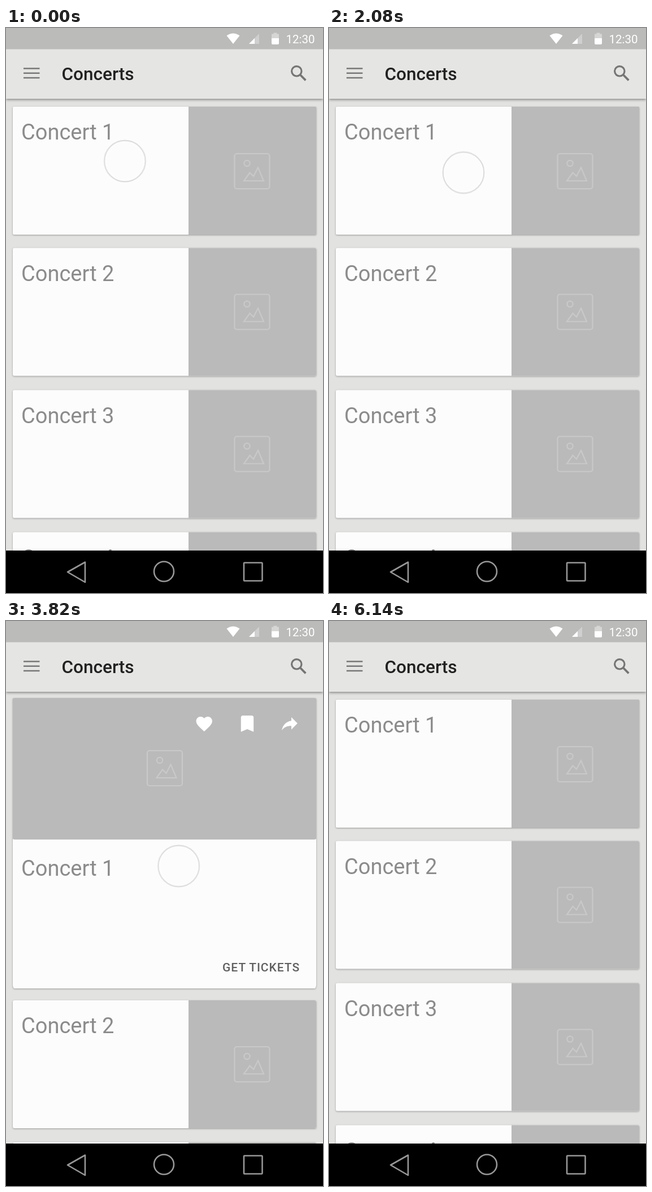
An HTML page for the animation above (6.94 s loop, 561x998 px).

```html
<!DOCTYPE html>
<html lang="en">
<head>
<meta charset="utf-8">
<title>Concerts</title>
<style>
  :root {
    --standard: cubic-bezier(.4, 0, .2, 1);
    --sine: cubic-bezier(.37, 0, .63, 1);
    --out: cubic-bezier(.2, .5, .5, 1);
  }
  html, body { margin: 0; width: 100%; height: 100%; overflow: hidden; background: #e2e2e1; }
  svg { display: block; width: 100vw; height: 100vh; }
  text { font-family: Roboto, "Liberation Sans", sans-serif; }

  .title { font-size: 38px; fill: #8b8b8b; }
  .head { font-size: 31.5px; font-weight: 500; fill: #212121; }
  .clock { font-size: 20.5px; fill: #fff; }
  .button { font-size: 21px; font-weight: 500; letter-spacing: 1px; fill: #5f5f5f; }
  .paper { fill: #fcfcfc; }
  .grey { fill: #bababa; }
  .line { fill: none; stroke: #c9c9c9; stroke-width: 2.2; }
  .nav { fill: none; stroke: #979797; stroke-width: 2.6; stroke-linejoin: round; }
  .card { filter: drop-shadow(0 1.5px 1.8px rgba(0, 0, 0, .32)); }
  .bar { filter: drop-shadow(0 2px 2px rgba(0, 0, 0, .38)); }

  /* One loop is 6940 ms, so 1% is 69.4 ms. */
  .fold, .photo, .folded, .detail, .next, .rest, .moveX, .moveY {
    animation: 6940ms linear infinite;
  }
  .fold { animation-name: fold; }
  .photo { animation-name: photo; }
  .folded { animation-name: folded; }
  .detail { animation-name: detail; }
  .next { animation-name: next; }
  .rest { animation-name: rest; }
  .moveX { animation-name: moveX; }
  .moveY { animation-name: moveY; }

  @keyframes fold {
    0%, 34.438%, 80.951%, 100% { transform: translate(12px, 139px) scaleY(1); animation-timing-function: var(--standard); }
    39.625%, 75.764% { transform: translate(12px, 136px) scaleY(2.27); animation-timing-function: var(--standard); }
  }
  @keyframes photo {
    0%, 34.438%, 80.951%, 100% { transform: translate(323px, 139px) scale(1, 1); animation-timing-function: var(--standard); }
    39.625%, 75.764% { transform: translate(12px, 136px) scale(2.376, 1.106); animation-timing-function: var(--standard); }
  }
  @keyframes folded {
    0%, 34.438%, 77.5%, 100% { opacity: 1; }
    37.5%, 75.764% { opacity: 0; }
  }
  @keyframes detail {
    0%, 36%, 77.5%, 100% { opacity: 0; }
    39.625%, 75.764% { opacity: 1; }
  }
  @keyframes next {
    0%, 34.438%, 80.951%, 100% { transform: translateY(0); animation-timing-function: var(--standard); }
    39.625%, 75.764% { transform: translateY(281.5px); animation-timing-function: var(--standard); }
  }
  @keyframes rest {
    0%, 34.438%, 77.81%, 100% { transform: translateY(0); animation-timing-function: var(--standard); }
    39.625%, 75.764% { transform: translateY(281.5px); animation-timing-function: var(--standard); }
  }

  @keyframes moveX {
    0% { transform: translateX(210.5px); animation-timing-function: var(--out); }
    2.594%, 7.493% { transform: translateX(180px); animation-timing-function: var(--sine); }
    13.833% { transform: translateX(422px); animation-timing-function: var(--sine); }
    21.974% { transform: translateX(212px); animation-timing-function: var(--sine); }
    27.666% { transform: translateX(237px); }
    29.971%, 50.432% { transform: translateX(238px); animation-timing-function: var(--sine); }
    54.755% { transform: translateX(307px); animation-timing-function: var(--sine); }
    57.349%, 63.689% { transform: translateX(296px); animation-timing-function: var(--sine); }
    66.282%, 69.885% { transform: translateX(320px); animation-timing-function: var(--sine); }
    74.063%, 81.988% { transform: translateX(286px); animation-timing-function: var(--sine); }
    88.617%, 100% { transform: translateX(600px); }
  }
  @keyframes moveY {
    0% { transform: translateY(235px); animation-timing-function: var(--out); }
    2.594%, 7.493% { transform: translateY(258px); animation-timing-function: var(--sine); }
    20.749% { transform: translateY(795px); animation-timing-function: var(--sine); }
    27.666%, 50.432% { transform: translateY(255.5px); animation-timing-function: var(--sine); }
    57.349%, 63.689% { transform: translateY(447px); animation-timing-function: var(--sine); }
    66.282%, 69.885% { transform: translateY(384px); animation-timing-function: var(--sine); }
    74.063%, 81.988% { transform: translateY(279px); animation-timing-function: var(--sine); }
    88.617%, 100% { transform: translateY(-33px); }
  }
</style>
</head>
<body>
<svg viewBox="0 0 561 998" preserveAspectRatio="none">
  <defs>
    <!-- picture placeholder, centred on its own origin -->
    <g id="picture" class="line">
      <rect x="-31" y="-31" width="62" height="62" rx="4"/>
      <circle cx="-9" cy="-14" r="5.2"/>
      <path d="M-14.500 17L-4 2.500L2.500 9L10.500 -6.500L20.500 17Z"/>
    </g>
    <g id="row">
      <rect class="paper" width="537" height="226" rx="3"/>
      <path class="grey" d="M311 0H534a3 3 0 0 1 3 3V223a3 3 0 0 1-3 3H311Z"/>
    </g>
  </defs>

  <rect width="561" height="998" fill="#e2e2e1"/>

  <g class="rest">
    <g class="card" transform="translate(12 890.5)">
      <use href="#row"/>
      <text class="title" x="15" y="58">Concert 4</text>
    </g>
    <g class="card" transform="translate(12 639.5)">
      <use href="#row"/>
      <use href="#picture" x="423.500" y="113"/>
      <text class="title" x="15" y="58">Concert 3</text>
    </g>
  </g>

  <g class="next">
    <g class="card" transform="translate(12 388.5)">
      <use href="#row"/>
      <use href="#picture" x="423.500" y="113"/>
      <text class="title" x="15" y="58">Concert 2</text>
    </g>
  </g>

  <g class="card">
    <g class="fold">
      <rect class="paper" width="537" height="226" rx="3"/>
      <g class="folded">
        <use href="#row"/>
        <text class="title" x="15" y="58">Concert 1</text>
      </g>
    </g>
    <g class="photo">
      <rect class="grey" width="226" height="226" rx="1.500"/>
      <use class="folded" href="#picture" x="112.500" y="114"/>
    </g>
  </g>
  <g class="detail">
    <use href="#picture" x="281" y="260"/>
    <text class="title" x="27" y="449.500">Concert 1</text>
    <text class="button" x="383" y="619">GET TICKETS</text>
    <g fill="#fff">
      <path transform="translate(333.7 164.700) scale(1.42)" d="M12 21.350l-1.450-1.320C5.400 15.360 2 12.280 2 8.500 2 5.420 4.420 3 7.500 3c1.740 0 3.410.810 4.500 2.090C13.090 3.810 14.760 3 16.500 3 19.580 3 22 5.420 22 8.500c0 3.780-3.400 6.860-8.550 11.540z"/>
      <path transform="translate(407.8 162.200) scale(1.6)" d="M17 3H7c-1.100 0-2 .900-2 2V21l7-3 7 3V5c0-1.100-.900-2-2-2z"/>
      <path transform="translate(483.3 162.200) scale(1.55)" d="M14 9V5l7 7-7 7v-4.100c-5 0-8.500 1.600-11 5.100 1-5 4-10 11-11z"/>
    </g>
  </g>

  <!-- app bar -->
  <rect class="bar" y="37" width="561" height="88" fill="#e5e5e3"/>
  <path d="M31 71.500H59.500M31 79.700H59.500M31 88H59.500" stroke="#777" stroke-width="2.600"/>
  <text class="head" x="98.500" y="92">Concerts</text>
  <g fill="none" stroke="#757575" stroke-width="3.200">
    <circle cx="514.300" cy="76.300" r="8.700"/>
    <path d="M520.500 82.500L530.300 92.300" stroke-width="3.800"/>
  </g>

  <!-- status bar -->
  <rect width="561" height="37.500" fill="#bbbbba"/>
  <g fill="#fff">
    <path d="M402 28L390.500 13.500Q402 5.500 413.500 13.500Z"/>
    <path d="M448 10V28H430Z" opacity=".3"/>
    <path d="M440 18V28H430Z"/>
    <path d="M473.500 8.500h6v2h3.500v8h-13v-8h3.500Z" opacity=".4"/>
    <path d="M470 18h13v9q0 2-2 2h-9q-2 0-2-2Z"/>
  </g>
  <text class="clock" x="495.500" y="27">12:30</text>

  <!-- navigation bar -->
  <rect y="923" width="561" height="75"/>
  <g class="nav">
    <path d="M109 961L140 943.500V979Z"/>
    <circle cx="279.500" cy="960" r="17.500"/>
    <rect x="421" y="944.500" width="32.500" height="32" rx="1"/>
  </g>

  <!-- touch point -->
  <g class="moveX">
    <g class="moveY">
      <circle r="36.200" fill="none" stroke="#000" stroke-opacity=".13" stroke-width="2.400"/>
      <circle r="34.600" fill="#fff" fill-opacity=".22" stroke="#fff" stroke-opacity=".7" stroke-width="1.400"/>
    </g>
  </g>
</svg>
</body>
</html>
```
